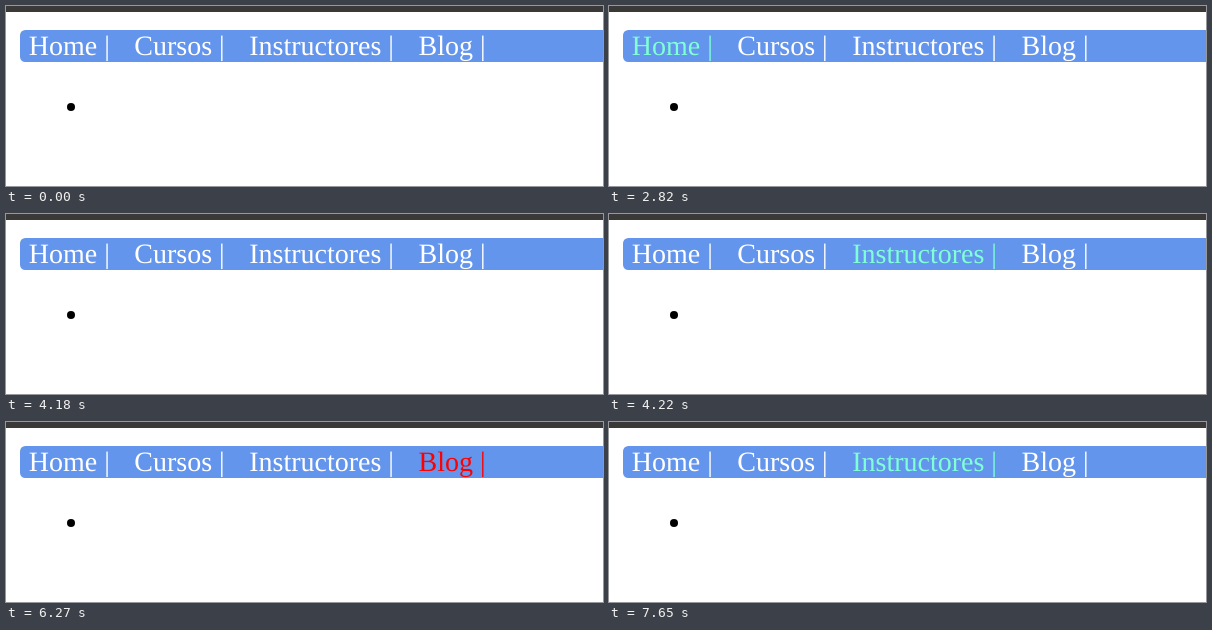
An HTML page that plays this animation: 597x180 px, repeating every 8000 ms.

```html
<!DOCTYPE html>
<html lang="es">
<head>
<meta charset="utf-8">
<title>Menu</title>
<style>
  html, body { margin: 0; width: 100%; height: 100%; overflow: hidden; background: #fff; }
  svg { display: block; }
  text { font: 28px "Liberation Serif", "Times New Roman", serif; text-rendering: geometricPrecision; }
</style>
</head>
<body>
<svg id="stage" width="597" height="180" viewBox="0 0 597 180">
  <rect width="597" height="6" fill="#3b3838"/>
  <rect x="14" y="24" width="620" height="32" rx="5.25" fill="cornflowerblue"/>
  <circle cx="65" cy="101" r="4"/>
</svg>
<script>
const LOOP = 8000;
const HOVER = "aquamarine", ACTIVE = "red", IDLE = "white";
const items = [["Home", 22.75], ["Cursos", 128.28], ["Instructores", 243.17], ["Blog", 412.47]];

// Pointer states: start time, item index (-1 for none), colour
const states = [
  [0, -1], [2820, 0, HOVER], [3500, -1], [3570, 1, HOVER],
  [4180, -1], [4220, 2, HOVER], [5020, -1], [5070, 3, HOVER],
  [6270, 3, ACTIVE], [7430, 3, HOVER], [7620, -1], [7650, 2, HOVER]
];

const stage = document.getElementById("stage");
const links = items.map(([label, x]) => {
  const link = document.createElementNS("http://www.w3.org/2000/svg", "text");
  link.setAttribute("x", x);
  link.setAttribute("y", 49);
  link.textContent = label + " |";
  return stage.appendChild(link);
});

function draw(time) {
  const [, current, color] = states.filter(([start]) => start <= time).pop();
  links.forEach((link, i) => link.setAttribute("fill", i === current ? color : IDLE));
}

const begin = performance.now();
function tick() {
  draw((performance.now() - begin) % LOOP);
  requestAnimationFrame(tick);
}
tick();
</script>
</body>
</html>
```
